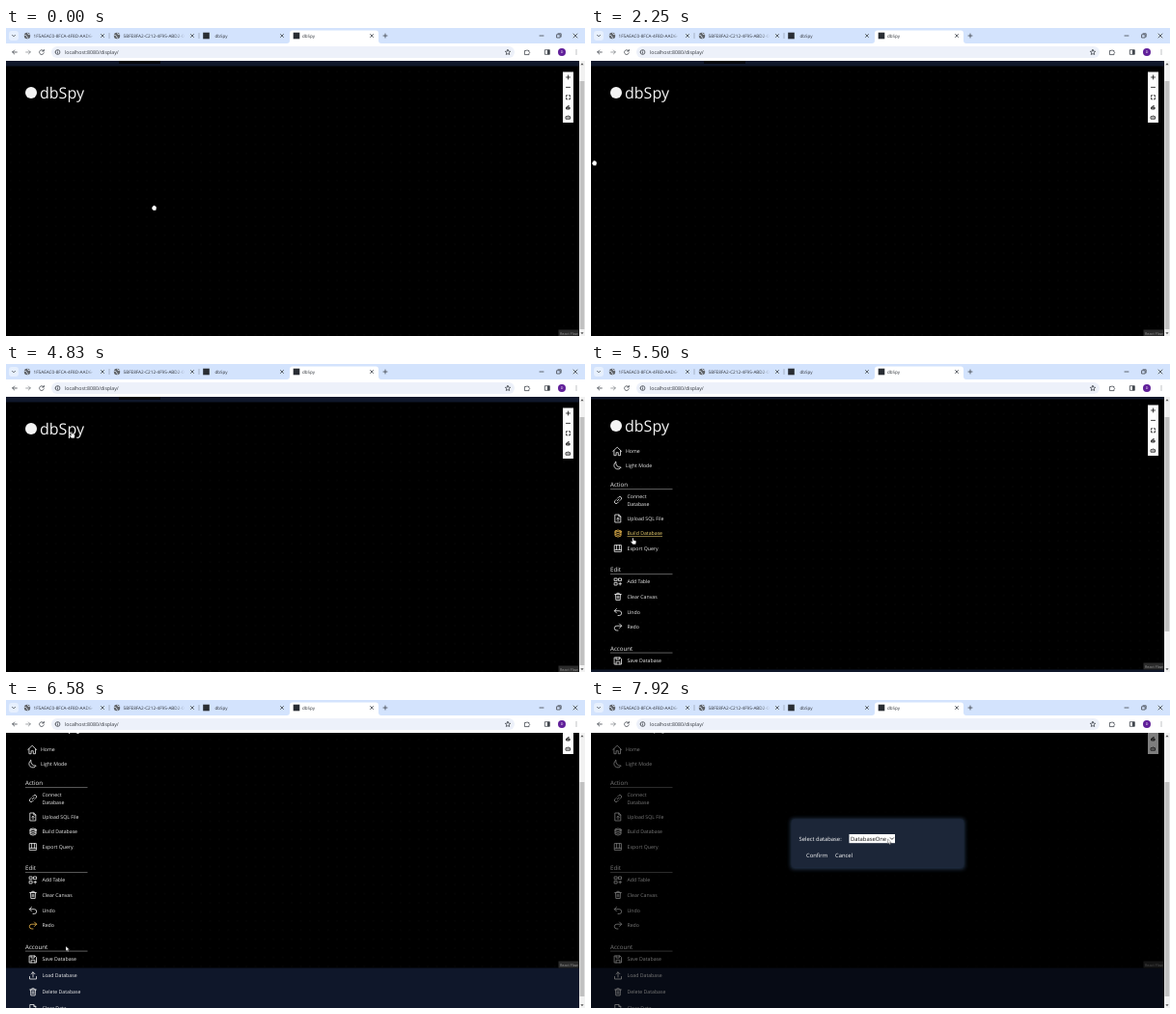
Recreate the animation shown at these times as an HTML page. Size 600 by 319 pixels, loop 8000 ms.

```html
<!DOCTYPE html>
<html lang="en">
<head>
<meta charset="utf-8">
<title>dbSpy</title>
<style>
  html, body { margin: 0; width: 100%; height: 100%; overflow: hidden; background: #000; }
  svg { display: block; width: 100vw; height: 100vh; font-family: "Open Sans", "Noto Sans", sans-serif; text-rendering: geometricPrecision; }
  .line { fill: none; stroke-width: .8; stroke-linecap: round; stroke-linejoin: round; }
  .chrome { stroke: #41464d; }
  .item text { fill: #f0f0f0; font-size: 5.2px; }
  .item path { stroke: #f0f0f0; }
  .item.hot text { fill: #f4d774; text-decoration: underline; }
  .item.warm path { stroke: #f2bd50; }
</style>
</head>
<body>
<svg viewBox="0 0 600 319" preserveAspectRatio="none">
  <defs>
    <pattern id="dots" width="9.4" height="9.4" patternUnits="userSpaceOnUse">
      <circle cx="4.7" cy="4.7" r=".4" fill="#1d1d1d"/>
    </pattern>
    <linearGradient id="tabFade">
      <stop offset="0" stop-color="#d3e3fd" stop-opacity="0"/>
      <stop offset="1" stop-color="#d3e3fd"/>
    </linearGradient>
    <filter id="glow" x="-10%" y="-30%" width="120%" height="160%"><feGaussianBlur stdDeviation="2"/></filter>
    <clipPath id="view"><rect y="34" width="594" height="285"/></clipPath>
  </defs>

  <g clip-path="url(#view)">
    <g id="page">
      <rect y="20" width="594" height="400" fill="#0f172a"/>
      <rect x="117" y="25" width="43" height="9" fill="#04060c"/>
      <rect y="36.5" width="594" height="280" fill="#000"/>
      <rect y="36.5" width="594" height="280" fill="url(#dots)"/>
      <circle cx="26" cy="64" r="6" fill="#f4f4f4"/>
      <text x="35" y="70" font-size="16" fill="#f4f4f4">dbSpy</text>
      <g id="menu"></g>
      <g id="controls"></g>
      <rect x="572.5" y="309.5" width="21" height="7" fill="#2b2b2b"/>
      <text x="574" y="314.5" font-size="3.8" fill="#999">React Flow</text>
    </g>
    <g id="modal">
      <rect y="34" width="594" height="285" fill="#000" opacity=".5"/>
      <rect x="207" y="123" width="180" height="52" rx="3" fill="#33486b" opacity=".8" filter="url(#glow)"/>
      <rect x="208" y="123.5" width="178" height="50" rx="2.5" fill="#1c2638"/>
      <rect x="267.5" y="139" width="47.5" height="9.2" fill="#fff"/>
      <g font-size="5.85" fill="#fff">
        <text x="215.5" y="146">Select database:</text>
        <text x="269" y="145.8" fill="#111">DatabaseOne</text>
        <text x="223" y="163">Confirm</text>
        <text x="253" y="163">Cancel</text>
      </g>
      <path class="line" stroke="#111" d="M310.3 142.8l1.6 1.6 1.6-1.6"/>
    </g>
  </g>

  <rect x="594" y="34" width="6" height="285" fill="#f1f1f1"/>
  <rect id="thumb" x="594.6" width="4.8" fill="#c1c1c1"/>
  <path fill="#555" d="M595.4 38.2h3.2l-1.6-2zM595.4 315.2h3.2l-1.6 2z"/>

  <g id="browser"></g>

  <g id="cursor">
    <path id="grab" fill="#fff" stroke="#222" stroke-width=".3" d="M-2.2-.6q0-1 .8-.9 0-1 .8-.9.6-.6 1.1 0 .9-.1 1 .7.9-.1.9.9v1.3l-.7 1.9h-2.6l-1.6-2z"/>
    <path id="point" fill="#fff" stroke="#222" stroke-width=".3" d="M-.6.5q.6-1 1.1 0v2l2.2.6q.7.3.6 1.2l-.5 2.5h-3l-2-2.6q.1-.9 1-.4l.6.5z"/>
    <path id="arrow" fill="#fff" stroke="#222" stroke-width=".35" d="M0 0v5l1.2-1.1.8 1.8.9-.4-.8-1.7h1.6z"/>
  </g>
</svg>

<script>
const LOOP = 8000, MENU_OPENS = 5080, MODAL_OPENS = 7000, HOVER_FADE = 150;
const byId = id => document.getElementById(id);
const show = (el, on) => { el.style.display = on ? "" : "none"; };
const text = (x, y, size, label, extra = "") => `<text x="${x}" y="${y}" font-size="${size}" ${extra}>${label}</text>`;
const icon = (x, y, d, extra = "") => `<path class="line chrome" transform="translate(${x} ${y})" d="${d}" ${extra}/>`;
const circle = r => `M${-r} 0a${r} ${r} 0 1 0 ${2 * r} 0a${r} ${r} 0 1 0 ${-2 * r} 0`;

// Browser frame
const cross = "M-1.5-1.5l3 3M1.5-1.5l-3 3";
const globe = x => `<circle cx="${x}" cy="8" r="3.2" fill="#5f6368"/>` +
  icon(x, 8, "M-2.6-.8q2 .2 2.2 1.6t1.2 1.8M2.5-1.3q-2 .6-2.2-1.2", 'style="stroke:#e4eefd"');
const tab = (x, label, isGlobe, size) =>
  (isGlobe ? globe(x) : `<rect x="${x - 3.3}" y="4.7" width="6.6" height="6.6" fill="#292d33"/>`) +
  text(x + (isGlobe ? 6.5 : 9 - (x > 300 ? 3 : 0)), 9.8, size, label);

byId("browser").innerHTML = `
  <rect width="600" height="17" fill="#d3e3fd"/>
  <rect y="16" width="600" height="18" fill="#fff"/>
  <path fill="#fff" d="M291 16q3 0 3-3V5.500q0-3 3-3h86q3 0 3 3V13q0 3 3 3z"/>
  <rect x="3" y="3" width="10" height="10" rx="3" fill="#e7f0fe"/>
  <rect x="47" y="19" width="480" height="12" rx="6" fill="#edf1fa"/>
  <g fill="#30343a">
    ${tab(22, "1F5AEAC0-8FCA-4F8D-AAD6-", true, 4.65)}
    ${tab(115, "5BFE8FA2-C212-4F95-ABD2-0", true, 4.65)}
    ${tab(207.500, "dbSpy", false, 4.5)}
    ${tab(301, "dbSpy", false, 4.5)}
    ${text(61, 26.9, 5.2, "localhost:8080/display/")}
  </g>
  <rect x="82" y="3" width="11" height="11" fill="url(#tabFade)"/>
  <rect x="93" y="3" width="4" height="11" fill="#d3e3fd"/>
  <rect x="175" y="3" width="11" height="11" fill="url(#tabFade)"/>
  <rect x="186" y="3" width="4" height="11" fill="#d3e3fd"/>
  ${[100, 193, 286, 379].map(x => icon(x, 8, cross)).join("")}
  ${[107, 200].map(x => icon(x, 8, "M0-2.500v5", 'opacity=".4"')).join("")}
  ${icon(8, 8, "M-1.500-.7L0 .8 1.500-.7")}
  ${icon(393, 8, "M-2 0h4M0-2v4")}
  ${icon(555, 8, "M-2 0h4")}
  ${icon(573, 8, "M-2-1.200h3.200v3.200h-3.200zM-1-2.200h3.200v3.200")}
  ${icon(590, 8, "M-2-2l4 4M2-2l-4 4")}
  ${icon(9, 25, "M2.300 0h-4.600M-.3-2l-2 2 2 2")}
  ${icon(23, 25, "M-2.300 0h4.600M.3-2l2 2-2 2", 'opacity=".6"')}
  ${icon(37, 25, "M2-1.200A2.400 2.400 0 1 0 2.300.8M2.300-2.600v1.600h-1.600")}
  ${icon(53.5, 25, circle(2.4) + "M0 0v1.200M0-1.200v.1")}
  ${icon(520, 25, "M0-2.600l.8 1.700 1.900.2-1.400 1.300.4 1.900L0 1.600l-1.700.9.4-1.900-1.400-1.300 1.900-.2z")}
  ${icon(540, 25, "M-2.200-1.500h1.500q.7-1.700 1.400 0h1.300v1.400q1.400.7 0 1.400v1.300h-4.200z")}
  ${icon(561, 25, "M-2.300-2.300h4.600v4.600h-4.600z")}
  <rect x="561" y="22.700" width="2.300" height="4.600" fill="#41464d"/>
  <circle cx="576" cy="25" r="4" fill="#61209a"/>
  ${text(576, 26.3, 3.6, "D", 'fill="#fff" text-anchor="middle"')}
  ${icon(591, 25, "M0-2v.01M0 0v.01M0 2v.01")}`;

// Canvas zoom controls
byId("controls").innerHTML = '<rect x="577" y="42.500" width="11" height="52.500" fill="#fefefe"/>' + [
  "M-2 0h4M0-2v4",
  "M-2 0h4",
  "M-2-.8V-2h1.200M.8-2H2v1.200M2 .8V2H.8M-.8 2H-2V.8",
  "M-1.500-.2h3v2h-3zM-1.500.8h3M-.9-.2q0-1.900 1.700-1.500",
  "M-2-.9h1.100l.4-.7h1l.4.7h1.100v2.500h-4zM-.4.3h.8"
].map((d, i) => icon(582.5, 48 + i * 10.4, d, 'style="stroke:#111"')).join("");

// Sidebar
const database = "M-3-2.600q3-2 6 0t-6 0v5.200q3 2 6 0v-5.200M-3-.8q3 2 6 0M-3 1q3 2 6 0";
const trash = "M-3.300-2.500h6.600M-1.200-2.500v-1.200h2.400v1.200M-2.500-2.500l.3 6h4.400l.3-6M-.8-.8v2.600M.8-.8v2.600";
const items = [
  [90.5, "Home", "M-4.500 0L0-4.300 4.500 0M-3.300-.8v5h2.200v-3h2.200v3h2.200v-5", 36],
  [105.5, "Light Mode", "M-1.500-4a4 4 0 1 0 5.500 5.500Q-1.500 2-1.500-4z", 36],
  [141, "Connect|Database", "M-.8.8l1.900-1.900M-.5-1.900l1.300-1.300q1.200-1 2.300.1t.1 2.300L1.900.5M.5 1.900L-.8 3.200q-1.200 1-2.300-.1t-.1-2.300L-1.900-.5"],
  [160, "Upload SQL File", "M-2.800-4h3.600l2 2v6h-5.600zM.8-4v2h2M0 2.400v-3M-1.200.5L0-.7 1.200.5"],
  [175.5, "Build Database", database],
  [191, "Export Query", "M-3.400-3.400h6.800v6.800h-6.800zM-3.400 1.400h6.800M-1.400-3.400v4.800M1.400-3.400v4.800"],
  [225.5, "Add Table", "M-3.500-3.500h2.600v2.600h-2.600zM.9-3.500h2.600v2.600H.9zM-3.500.9h2.600v2.600h-2.600zM2.200.9v2.600M.9 2.200h2.600"],
  [241, "Clear Canvas", trash],
  [257, "Undo", "M-1.500-3.500l-2.200 2.200 2.200 2.200M-3.700-1.300H1.200q2.500 0 2.500 2.400T1.200 3.500H0"],
  [272.5, "Redo", "M1.500-3.500l2.200 2.200-2.200 2.200M3.700-1.300H-1.200q-2.500 0-2.500 2.400t2.500 2.400H0"],
  [307.5, "Save Database", "M-3.500-3.500h5.500l1.500 1.500v5.500h-7zM-1.900-3.500v2.100h3.200v-2.100M-1.900 3.500V.8h3.800v2.700"],
  [324.5, "Load Database", "M-3.500 1v2.500h7V1M0 1.500v-5M-2-1.700l2-2 2 2"],
  [341.5, "Delete Database", trash],
  [358.5, "Clear Data", "M-2.800-4h3.600l2 2v6h-5.600zM.8-4v2h2"]
];
const headings = [[125, "Action"], [213, "Edit"], [294.5, "Account"]];

byId("menu").innerHTML = items.map(([y, label, d, x = 37.5]) => {
  const lines = label.split("|");
  const words = lines.map((line, i) => text(x, y + 1.9 + (i - (lines.length - 1) / 2) * 8, 5.2, line)).join("");
  return `<g class="item"><path class="line" transform="translate(${x === 36 ? 27.2 : 28} ${y})" d="${d}"/>${words}</g>`;
}).join("") + headings.map(([y, label]) =>
  text(20, y + 2.1, 6.15, label, 'fill="#f0f0f0"') +
  `<path d="M20 ${y + 4.6}h64.500" stroke="#a0a0a0" stroke-width=".6"/>`).join("");
const itemNodes = [...document.querySelectorAll(".item")];

// Motion: [time, x, y] of the pointer's hot spot
const path = [
  [0, 153.5, 186.5], [900, 130, 180], [1700, 40, 158], [2250, 3.5, 140], [2500, 70, 80],
  [2620, 84, 76], [3330, 62, 73], [4170, 60, 71], [4830, 68, 70], [5040, 66, 71],
  [5350, 43.5, 178], [5500, 43.5, 180], [5900, 44, 195], [6400, 46, 234], [6580, 62, 255],
  [6900, 58, 267], [7550, 58, 267], [7900, 307.5, 144], [LOOP, 307.5, 144]
];
const ease = (t, from, to) => {
  const p = Math.min(1, Math.max(0, (t - from) / (to - from)));
  return p * p * (3 - 2 * p);
};
function pointerAt(t) {
  const i = Math.max(1, path.findIndex(key => key[0] >= t));
  const [t0, x0, y0] = path[i - 1], [t1, x1, y1] = path[i];
  const p = ease(t, t0, t1);
  return [x0 + (x1 - x0) * p, y0 + (y1 - y0) * p];
}
const scrollAt = t => t < MENU_OPENS ? -3 : 39 * ease(t, 6000, 6300);
function hoveredAt(t) {
  if (t < MENU_OPENS || t >= MODAL_OPENS) return -1;
  const y = pointerAt(t)[1] + scrollAt(t);
  return items.findIndex(item => Math.abs(item[0] - y) < 7.6);
}

function draw() {
  const t = performance.now() % LOOP;
  const [x, y] = pointerAt(t), scroll = scrollAt(t);
  const hot = hoveredAt(t), cooling = t < MODAL_OPENS ? hoveredAt(t - HOVER_FADE) : -1;
  const menuOpen = t >= MENU_OPENS;

  byId("page").setAttribute("transform", `translate(0 ${-scroll})`);
  show(byId("menu"), menuOpen);
  show(byId("modal"), t >= MODAL_OPENS);
  itemNodes.forEach((node, i) => {
    node.classList.toggle("hot", i === hot);
    node.classList.toggle("warm", i === hot || i === cooling);
  });

  byId("thumb").setAttribute("y", 55 + (menuOpen ? scroll * 30 / 39 : 0));
  byId("thumb").setAttribute("height", menuOpen ? 222 : 257);

  const shape = t < 2450 ? "grab" : !menuOpen || hot >= 0 ? "point" : "arrow";
  for (const id of ["grab", "point", "arrow"]) show(byId(id), id === shape);
  byId("cursor").setAttribute("transform", `translate(${x} ${y})`);
  requestAnimationFrame(draw);
}
draw();
</script>
</body>
</html>
```
